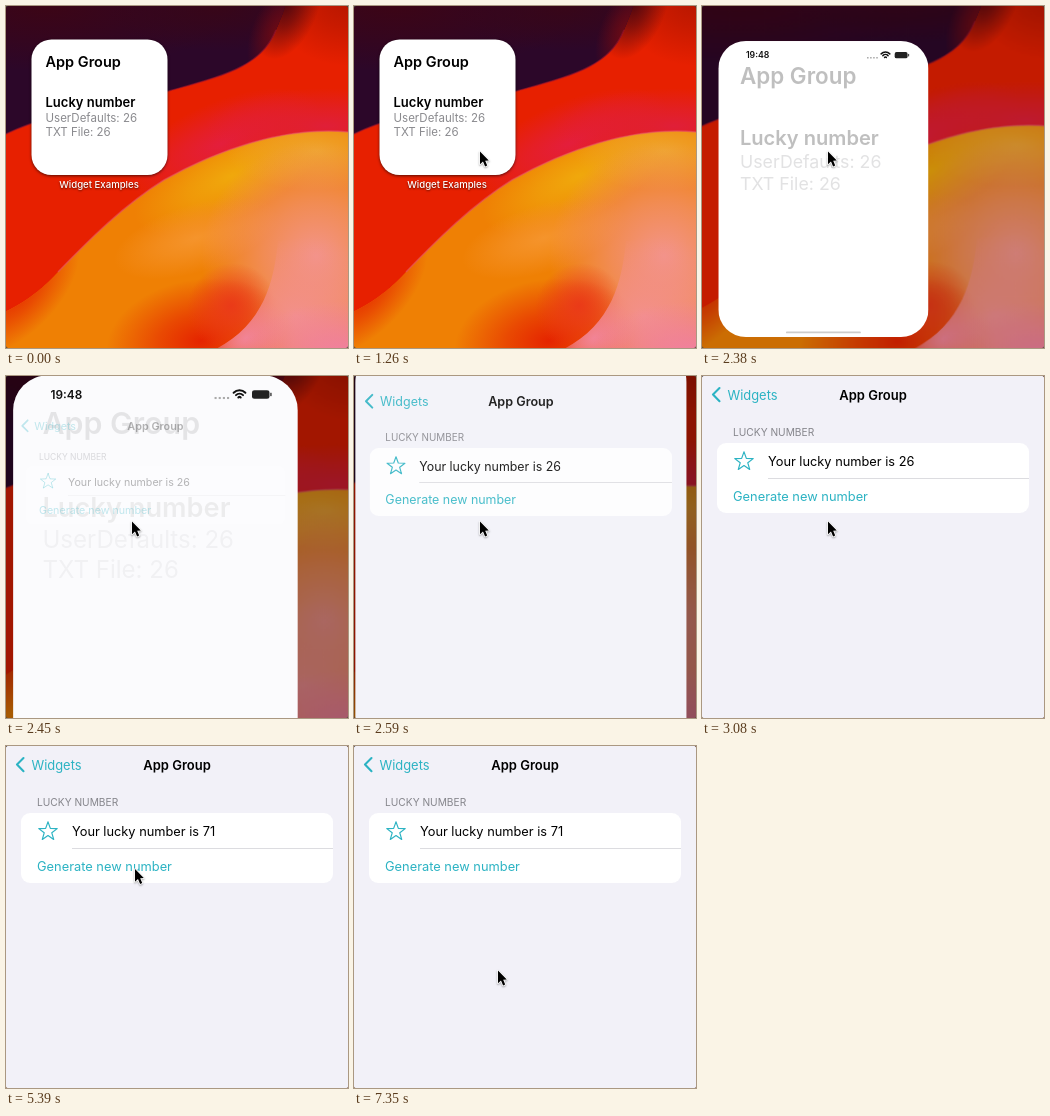
Recreate the animation shown at these times as an HTML page with a canvas. Size 342 px wide and 342 px high, loop 8 s.

```html
<!DOCTYPE html>
<html lang="en">
<head>
<meta charset="utf-8">
<title>App Group widget</title>
<style>
html, body { margin: 0; width: 100%; height: 100%; overflow: hidden; background: #444; }
canvas { display: block; width: 100vw; height: 100vh; }
</style>
</head>
<body>
<canvas id="stage" width="342" height="342"></canvas>
<script>
const SIZE = 342, LOOP = 8000, STEP = 70;
const TEAL = '#2cb3c3';
const ctx = document.getElementById('stage').getContext('2d');
const wallpaper = document.createElement('canvas');

const clamp = v => Math.max(0, Math.min(1, v));
const mix = (a, b, p) => a + (b - a) * p;
const smooth = u => u * u * (3 - 2 * u);

function text(str, x, y, size, color = '#000', weight = 400, align = 'left') {
  ctx.font = `${weight} ${size}px Inter, sans-serif`;
  ctx.textAlign = align;
  ctx.fillStyle = color;
  ctx.fillText(str, x, y);
}

function roundRect(c, x, y, w, h, r) {
  c.beginPath();
  c.roundRect(x, y, w, h, r);
}

function line(points, color, width) {
  ctx.beginPath();
  points.forEach(([x, y]) => ctx.lineTo(x, y));
  ctx.strokeStyle = color;
  ctx.lineWidth = width;
  ctx.stroke();
}

// Wallpaper, painted once with a margin so it can be enlarged behind the window.
const MARGIN = 60;
function paintWallpaper() {
  wallpaper.width = wallpaper.height = SIZE + 2 * MARGIN;
  const c = wallpaper.getContext('2d');
  c.translate(MARGIN, MARGIN);

  const glow = (x, y, rx, ry, color, angle = 0) => {
    c.save();
    c.translate(x, y);
    c.rotate(angle);
    c.scale(rx, ry);
    const g = c.createRadialGradient(0, 0, 0, 0, 0, 1);
    g.addColorStop(0, color);
    g.addColorStop(.45, color + '99');
    g.addColorStop(1, color + '00');
    c.fillStyle = g;
    c.fillRect(-1, -1, 2, 2);
    c.restore();
  };
  const area = (path, color, paint) => {
    c.save();
    c.clip(new Path2D(path));
    c.fillStyle = color;
    c.fillRect(-MARGIN, -MARGIN, SIZE + 2 * MARGIN, SIZE + 2 * MARGIN);
    paint();
    c.restore();
  };
  const edge = (path, color) => {
    c.strokeStyle = color;
    c.lineWidth = 1.5;
    c.stroke(new Path2D(path));
  };

  c.fillStyle = '#e72000';
  c.fillRect(-MARGIN, -MARGIN, SIZE + 2 * MARGIN, SIZE + 2 * MARGIN);
  glow(215, 138, 105, 42, '#e41e3c', -.4);
  glow(320, 120, 120, 38, '#e01f38');
  glow(342, -10, 80, 70, '#b41600');
  glow(280, -5, 34, 60, '#4a0610', .3);

  area('M-60 150L0 128C50 104 105 101 163 85C215 70 255 62 270 24C274 14 277 8 279 0L282 -60H-60Z', '#2c0729', () => {
    glow(40, 0, 190, 65, '#3c0516');
    glow(210, 0, 110, 45, '#380618');
    glow(272, 25, 26, 50, '#6e0a14', .4);
  });
  edge('M-60 150L0 128C50 104 105 101 163 85C215 70 255 62 270 24', '#a0142e90');

  const ridge = 'M402 132L342 126C275 120 208 146 158 174C118 199 85 232 52 266';
  area(ridge + 'C35 284 15 305 -60 330V402H402Z', '#ef8004', () => {
    glow(225, 170, 105, 42, '#f0a80c', -.45);
    glow(310, 145, 90, 40, '#efa52c');
    glow(190, 232, 85, 34, '#f5942c', -.3);
    glow(10, 285, 80, 42, '#e52800', -.8);
    glow(310, 250, 115, 115, '#f3948a');
    glow(195, 335, 95, 62, '#e52400', -.15);
    glow(225, 300, 45, 42, '#ea3a18', -.6);
  });
  edge(ridge, '#e8556a90');
  area('M402 220L272 235C268 275 258 318 210 343L180 402H402Z', '#0000', () => {
    glow(290, 310, 110, 80, '#f3908c');
    glow(240, 332, 45, 30, '#f28496', -.6);
    glow(342, 350, 110, 55, '#f07fa8');
  });
}

function drawWallpaper(p) {
  const cx = 171, cy = 328, s = 1 + .08 * p;
  ctx.save();
  ctx.translate(cx, cy);
  ctx.scale(s, s);
  ctx.drawImage(wallpaper, -cx - MARGIN, -cy - MARGIN);
  ctx.restore();
  ctx.fillStyle = `rgba(0,0,0,${.42 * p})`;
  ctx.fillRect(0, 0, SIZE, SIZE);
}

function widgetText() {
  text('App Group', 14, 27.8, 14.5, '#000', 600);
  text('Lucky number', 14, 67.6, 13, '#000', 600);
  text('UserDefaults: 26', 14, 82.4, 11.5, '#8a8a8e');
  text('TXT File: 26', 14, 96.6, 11.5, '#8a8a8e');
}

function drawWidget() {
  ctx.save();
  ctx.shadowColor = 'rgba(0,0,0,.6)';
  ctx.shadowBlur = 3;
  ctx.shadowOffsetY = 1;
  ctx.fillStyle = '#fff';
  roundRect(ctx, 25.5, 33.5, 136, 135.5, 20);
  ctx.fill();
  ctx.shadowBlur = 2;
  text('Widget Examples', 93, 182.2, 9.6, '#fff', 500, 'center');
  ctx.restore();
  ctx.save();
  ctx.translate(25.5, 33.5);
  widgetText();
  ctx.restore();
}

function statusBar() {
  text('19:48', 64, -14, 14.2, '#111', 600, 'center');
  ctx.fillStyle = '#aaa';
  for (let i = 0; i < 4; i++) ctx.fillRect(242 + i * 5, -16, 2.5, 2.5);
  ctx.strokeStyle = '#111';
  ctx.lineWidth = 2.4;
  for (const r of [2, 6, 10]) {
    ctx.beginPath();
    ctx.arc(272, -14, r, -Math.PI * .75, -Math.PI * .25);
    ctx.stroke();
  }
  ctx.fillStyle = '#222';
  roundRect(ctx, 287, -24, 21, 10, 3);
  ctx.fill();
  ctx.fillRect(309, -21, 1.5, 4);
}

function appPage(number) {
  ctx.fillStyle = '#f2f1f8';
  ctx.fillRect(0, -42, SIZE, 760);
  ctx.lineJoin = ctx.lineCap = 'round';
  line([[17.5, 12], [11, 18.6], [17.5, 25.2]], TEAL, 2.1);
  text('Widgets', 25.5, 23.6, 12.9, TEAL);
  text('App Group', 171, 23.6, 13, '#000', 600, 'center');
  text('LUCKY NUMBER', 31, 60, 10.2, '#85858b');

  ctx.fillStyle = '#fff';
  roundRect(ctx, 15, 67, 312, 70, 9);
  ctx.fill();
  ctx.fillStyle = '#dcdce0';
  ctx.fillRect(66, 102, 261, 1);

  const star = Array.from({ length: 11 }, (_, i) => {
    const a = Math.PI * (i / 5 - .5), r = i % 2 ? 4 : 9.7;
    return [42 + r * Math.cos(a), 85.6 + r * Math.sin(a)];
  });
  line(star, TEAL, 1.2);
  text('Your lucky number is ' + number, 66, 90.4, 12.8);
  text('Generate new number', 31, 125, 12.85, TEAL);
}

function drawWindow(t) {
  const p = 1 - .64 * Math.exp(-11.9 * (t - 2380) / 1000);
  const open = t >= 3080 ? 1 : p;
  const w = mix(136, SIZE, open), h = mix(136, 740, open ** 1.3);
  const x = mix(93.5, 171, open) - w / 2, y = mix(101.5, 328, open) - h / 2;
  drawWallpaper(open);

  ctx.save();
  roundRect(ctx, x, y, w, h, mix(20, 41, open));
  ctx.clip();
  ctx.fillStyle = '#fff';
  ctx.fillRect(x, y, w, h);

  const widgetAlpha = .25 * clamp(1 - (t - 2380) / 140);
  if (widgetAlpha) {
    ctx.save();
    ctx.globalAlpha = widgetAlpha;
    ctx.translate(x, y);
    ctx.scale(w / 136, w / 136);
    widgetText();
    ctx.restore();
  }

  const s = w / SIZE;
  ctx.save();
  ctx.translate(x, y);
  ctx.scale(s, s);
  ctx.translate(0, 42);
  ctx.globalAlpha = clamp((t - 2380) / 245);
  appPage(t < 5320 ? 26 : 71);
  ctx.globalAlpha = 1;
  statusBar();
  ctx.restore();

  ctx.fillStyle = '#ccc';
  roundRect(ctx, x + w / 2 - 61 * s, y + h - 9 * s, 122 * s, 3 * s, 2 * s);
  ctx.fill();
  ctx.restore();
}

// Pointer moves: start, end, from, to.
const MOVES = [
  [840, 1260, [171, 328], [126, 145.5]],
  [3780, 4130, [126, 145.5], [129, 123]],
  [6930, 7350, [129, 123], [144, 224.5]],
];

function drawPointer(t) {
  const move = MOVES.filter(m => t >= m[0]).pop();
  if (!move) return;
  const [start, end, from, to] = move;
  const u = smooth(clamp((t - start) / (end - start)));
  const x = mix(from[0], to[0], u), y = mix(from[1], to[1], u);

  const pressed = t >= 2170 && t < 2240 || t >= 5180 && t < 5320;
  const released = t >= 2240 && t < 2310 || t >= 5320 && t < 5390;
  if (pressed || released) {
    ctx.fillStyle = `rgba(128,128,128,${pressed ? .3 : .12})`;
    ctx.beginPath();
    ctx.arc(x, y + 1, 22, 0, 2 * Math.PI);
    ctx.fill();
  }

  ctx.save();
  ctx.translate(x, y);
  ctx.scale(.88, .88);
  ctx.beginPath();
  [[0, 0], [0, 14.5], [3.4, 11.5], [5.8, 17], [8.2, 16], [5.9, 10.6], [10, 10.3]]
    .forEach(([px, py]) => ctx.lineTo(px, py));
  ctx.closePath();
  ctx.lineJoin = 'round';
  ctx.strokeStyle = '#fff';
  ctx.lineWidth = 1.8;
  ctx.shadowColor = 'rgba(0,0,0,.35)';
  ctx.shadowBlur = 2;
  ctx.shadowOffsetY = 1;
  ctx.stroke();
  ctx.shadowColor = 'transparent';
  ctx.fillStyle = '#000';
  ctx.fill();
  ctx.restore();
}

function draw(now) {
  const t = Math.floor((now % LOOP) / STEP + 1e-6) * STEP;
  ctx.clearRect(0, 0, SIZE, SIZE);
  ctx.save();
  roundRect(ctx, 0, 0, SIZE, SIZE, 2.5);
  ctx.clip();
  if (t < 2380) {
    drawWallpaper(0);
    drawWidget();
  } else {
    drawWindow(t);
  }
  drawPointer(t);
  ctx.restore();
}

paintWallpaper();
const began = performance.now();
function tick() {
  draw(performance.now() - began);
  requestAnimationFrame(tick);
}
tick();
</script>
</body>
</html>
```
